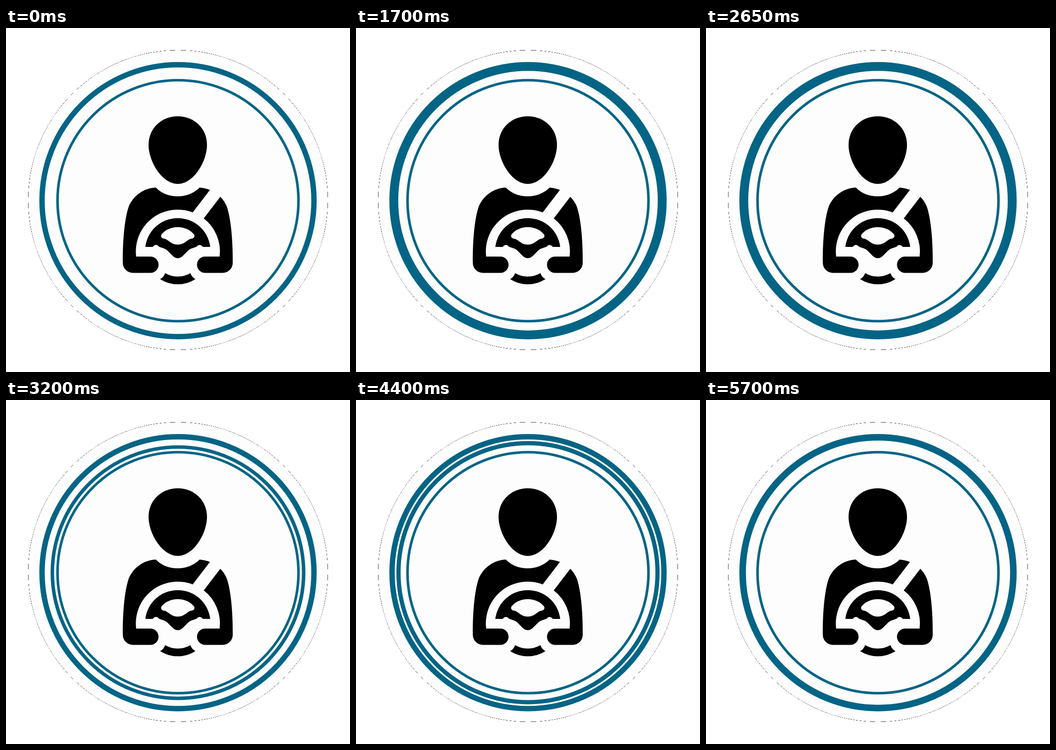
Write an HTML page with a canvas that moves like this. It is 748 px wide and 748 px high and loops after 5.75 s.

```html
<!DOCTYPE html>
<html lang="en">
<head>
<meta charset="utf-8">
<title>Driver badge</title>
<style>
  html, body { margin: 0; width: 100%; height: 100%; overflow: hidden; background: #fff; }
  canvas { display: block; width: 748px; height: 748px; }
</style>
</head>
<body>
<canvas id="stage" width="748" height="748"></canvas>
<script>
const SIZE = 748;
const LOOP = 5750;
const TICK = 50;      // display grid, ms
const STEP = 80;      // one pose, ms
const POSES = 12;     // poses per pulse
const BLUE = '#036485';
const PAPER = '#fdfdfd';
const CX = 374, CY = 375.5;
const THIN = { inner: 259.2, outer: 264.8 };
const THICK = { inner: 289.8, outer: 301.5 };

const ctx = document.getElementById('stage').getContext('2d');

const head = new Path2D(
  'M373.5 192 C410 192 437 219 437 254 C437 290 408 339 373.5 339' +
  'C339 339 310 290 310 254 C310 219 337 192 373.5 192Z');

const leftBody = new Path2D(
  'M326 347 C337 359 354 366 373.5 366 C392 366 409 359 421 347' +
  'Q433 348 443.5 352 L406 401 A91 91 0 0 0 283 497 L314 497' +
  'A17.7 17.7 0 0 1 314 532.5 L276 532.5 A22 22 0 0 1 254 510.5' +
  'C253.5 470 257 416 267 388 C277 364 300 348 326 347Z');

const rightBody = new Path2D(
  'M466 367 L430 414 A91 91 0 0 1 464.5 497 L433 497' +
  'A17.7 17.7 0 0 0 433 532.5 L471 532.5 A22 22 0 0 0 493 510.5' +
  'C493.5 470 490 416 480 388 Q475 376 466 367Z');

// Upper rim with its hub opening, filled even-odd
const wheel = new Path2D(
  'M303 476 A71 71 0 0 1 444 476 L428 476 C424 471 419 470 415 475' +
  'C411 478 402 478 396 484 L384 496 Q373.5 505 363 496 L351 484' +
  'C345 478 336 478 332 475 C328 470 323 471 319 476Z' +
  'M338 449 C347 438 360 433 373.5 433 C387 433 400 438 409 449' +
  'C411 453 409 457 404 458 C394 459 389 471 373.5 471' +
  'C358 471 353 459 343 458 C338 457 336 453 338 449Z');

const rimBottom = new Path2D(
  'M335 546 A71 71 0 0 0 412 546 Q404 542 401 533' +
  'A54 54 0 0 1 346 533 Q343 542 335 546Z');

function ring(inner, outer) {
  ctx.beginPath();
  ctx.arc(CX, CY, (inner + outer) / 2, 0, Math.PI * 2);
  ctx.lineWidth = outer - inner;
  ctx.strokeStyle = BLUE;
  ctx.stroke();
}

// Broken one-pixel outline: only pixels lying just inside the radius
function makeEdge(radius) {
  const edge = new Path2D();
  const mid = SIZE / 2;
  for (let y = 0; y < SIZE; y++) {
    const dy = y + 0.5 - mid;
    if (Math.abs(dy) > radius) continue;
    const half = Math.sqrt(radius * radius - dy * dy);
    const span = Math.abs(dy) > radius - 2 ? half : Math.min(half, 40);
    for (let x = Math.floor(mid - half); x <= mid - half + span; x++) {
      const gap = radius - Math.hypot(x + 0.5 - mid, dy);
      if (gap > 0 && gap < 0.45) {
        edge.rect(x, y, 1, 1);
        edge.rect(SIZE - 1 - x, y, 1, 1);
      }
    }
  }
  return edge;
}
const edge = makeEdge(326);

function draw(ms) {
  const t = Math.floor((ms % LOOP) / TICK) * TICK;
  const p = (Math.floor(t / STEP) % POSES) / POSES;
  const mix = key => THIN[key] + (THICK[key] - THIN[key]) * p;

  ctx.fillStyle = '#fff';
  ctx.fillRect(0, 0, SIZE, SIZE);
  ctx.fillStyle = PAPER;
  ctx.beginPath();
  ctx.arc(SIZE / 2, SIZE / 2, 326, 0, Math.PI * 2);
  ctx.fill();
  ctx.fillStyle = '#444';
  ctx.fill(edge);

  ring(THICK.inner, THICK.outer);
  ring(THIN.inner, THIN.outer);
  if (p > 0) ring(mix('inner'), mix('outer'));

  ctx.fillStyle = '#000';
  for (const part of [head, leftBody, rightBody, rimBottom]) ctx.fill(part);
  ctx.fill(wheel, 'evenodd');
}

const start = performance.now();
function loop() {
  draw(performance.now() - start);
  requestAnimationFrame(loop);
}
loop();
</script>
</body>
</html>
```
